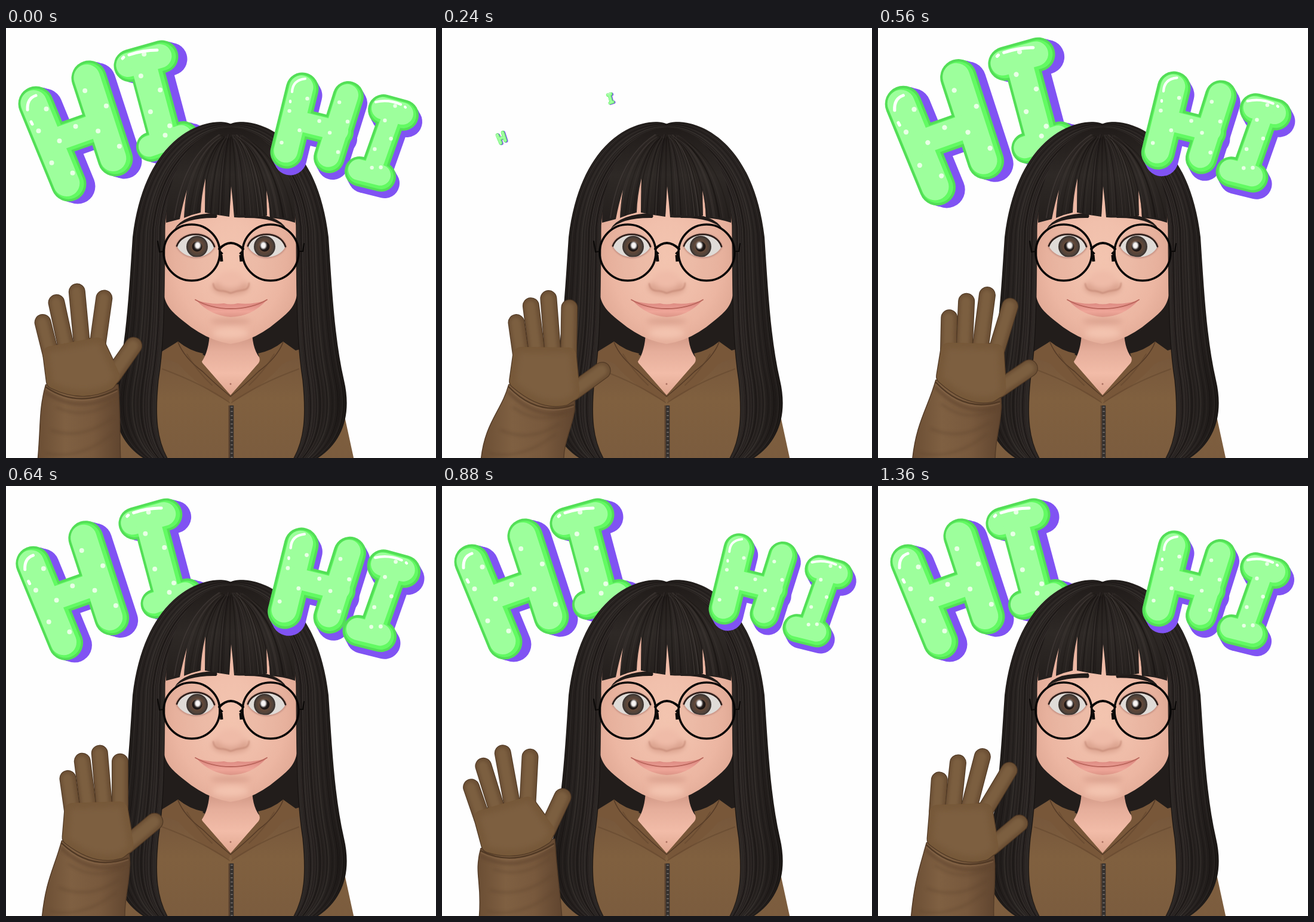
An HTML page for the animation above (1.44 s loop, 720 by 720 pixels).

```html
<!DOCTYPE html>
<html lang="en">
<head>
<meta charset="utf-8">
<title>Waving hello</title>
<style>
html, body { margin: 0; width: 100%; height: 100%; overflow: hidden; background: #fefefe; }
svg { display: block; width: 100vw; height: 100vh; }
</style>
</head>
<body>
<svg id="stage" viewBox="0 0 720 720" fill="none" stroke-linecap="round" stroke-linejoin="round"></svg>
<script>
const STEP = 80, STEPS = 18;
const el = id => document.getElementById(id);
const mix = (a, b, t) => a + (b - a) * t;
const mixAll = (a, b, t) => a.map((v, i) => mix(v, b[i], t));
// point at a compass-like angle: 0 is up, 90 is right
const polar = ([x, y], deg, r) => [x + r * Math.sin(deg * Math.PI / 180), y - r * Math.cos(deg * Math.PI / 180)];

let seed = 7;
const rnd = () => (seed = (seed * 16807) % 2147483647) / 2147483647;

const line = (d, color, width, extra = '') => `<path d="${d}" stroke="${color}" stroke-width="${width}" ${extra}/>`;
const shape = (d, fill, extra = '') => `<path d="${d}" fill="${fill}" ${extra}/>`;
const mirror = s => `<g transform="translate(752 0) scale(-1 1)">${s}</g>`;

// ---------- bubble letters: strokes are [x0, y0, x1, y1, width, dots] ----------
const leftStyle = { shadow: [15, 4], dot: 4, start: 3 };
const rightStyle = { shadow: [6, 11], dot: 3.2, start: 5, drift: [0, 0] };
const letters = {
  h1: { ...leftStyle, c: [122, 174], drift: [-22, 10], shine: 'M36 137Q35 118 50 113M42 157L44 161',
    strokes: [[50, 127, 105, 261, 59, 5], [139, 84, 183, 219, 59, 4], [78, 191, 163, 161, 54, 1]] },
  i1: { ...leftStyle, c: [252, 122], drift: [30, -4], shine: 'M195 51L197 49M206 45Q230 37 253 37',
    strokes: [[208, 63, 261, 48, 55, 1], [234, 62, 266, 182, 57, 4], [243, 199, 297, 181, 50, 1]] },
  h2: { ...rightStyle, c: [523, 166], shine: 'M479 107Q480 87 501 85M476 122L476 124',
    strokes: [[496, 102, 470, 208, 55, 4], [573, 115, 541, 217, 52, 4], [486, 157, 558, 175, 48, 1]] },
  i2: { ...rightStyle, c: [632, 198], shine: 'M619 124Q640 119 661 128M668 132L669 133',
    strokes: [[632, 137, 665, 146, 52, 1], [648, 146, 614, 242, 45, 4], [592, 240, 628, 249, 50, 1]] }
};

// white dots zigzag along each stroke
function dots({ strokes, dot }) {
  let s = '';
  strokes.forEach(([x0, y0, x1, y1, w, n], j) => {
    const len = Math.hypot(x1 - x0, y1 - y0);
    for (let i = 0; i < n; i++) {
      const t = (i + .5) / n, side = ((i + j) % 2 ? -1 : 1) * w * .22;
      const cx = mix(x0, x1, t) + side * (y1 - y0) / len, cy = mix(y0, y1, t) - side * (x1 - x0) / len;
      s += `<circle cx="${cx}" cy="${cy}" r="${dot}" fill="#e9ffe6"/>`;
    }
  });
  return s;
}

function letter(id) {
  const o = letters[id], [px, py] = o.shadow;
  const layer = (k, grow, color) => `<g transform="translate(${px * k} ${py * k})">` +
    o.strokes.map(([a, b, c, d, w]) => line(`M${a} ${b}L${c} ${d}`, color, w + grow)).join('') + '</g>';
  return `<g id="${id}">` + layer(1, 0, '#8053f3') + layer(.5, 0, '#8053f3') + layer(0, 0, '#53de57') +
    layer(0, -8, '#62fa62') + layer(-.24, -15, '#9dff9c') + dots(o) + line(o.shine, '#fff', o.dot + 1) + '</g>';
}

// quick pop, then one wobble around full size
function placeLetter(id, k) {
  const { c: [x, y], drift: [dx, dy], start } = letters[id];
  const n = k ? k - start : STEPS, turn = Math.PI * (n - 1.6) / 6.4;
  let size = 1, drift = 0;
  if (n < 2) {
    size = mix(.1, 1, n / 2);
    drift = 1 - n / 2;
  } else if (n < 8) {
    size = 1 + .055 * Math.sin(2 * turn);
    drift = .24 * Math.sin(turn);
  }
  el(id).setAttribute('display', n < 0 ? 'none' : 'inline');
  el(id).setAttribute('transform', `translate(${x + dx * drift} ${y + dy * drift}) scale(${size}) translate(${-x} ${-y})`);
}

// ---------- hair: two edge curves, strands run between them ----------
const outer = [377, 161, 350, 147, 234, 165, 212, 350, 206, 440, 202, 520, 186, 590, 172, 650, 190, 698, 236, 724];
const inner = [377, 172, 325, 180, 272, 250, 266, 330, 265, 450, 266, 520, 255, 590, 249, 650, 252, 690, 272, 724];
const curve = n => `M${n[0]} ${n[1]}` + [2, 8, 14].map(i => 'C' + n.slice(i, i + 6).map(v => v.toFixed(1)).join(' ')).join('');
const reversed = n => n.map((v, i) => n[n.length - 2 - i + 2 * (i % 2)]);
const strand = (d, extra = '') => line(d, rnd() < .5 ? '#453e3b' : '#100c0b', .6 + 1.3 * rnd(), `opacity="${.2 + .3 * rnd()}" ${extra}`);

function sideHair() {
  let s = shape(curve(outer) + curve(reversed(inner)).replace('M', 'L') + 'Z', 'url(#side)');
  for (let i = 0; i < 38; i++) s += strand(curve(mixAll(outer, inner, .03 + .94 * rnd())));
  return s + line(curve(inner), '#15110f', 1.5, 'opacity=".7"');
}

function bangs() {
  const d = 'M268 326C268 255 300 172 377 166C452 172 486 255 484 326Q463 319 442 318Q441 292 436 272L437 314Q410 319 382 317Q380 290 377 265L374 316Q352 313 333 309Q333 280 334 252Q327 280 326 309Q312 312 298 318Q299 296 303 271Q296 294 291 320Z';
  let s = `<clipPath id="fringeClip"><path d="${d}"/></clipPath>` + shape(d, 'url(#fringe)');
  for (let i = 0; i < 64; i++) {
    const x = 270 + 212 * rnd(), u = x - 376;
    s += strand(`M${376 + u * .2} ${178 + 8 * rnd()}C${376 + u * .65} 205 ${376 + u * .9} 255 ${x} ${311 + Math.abs(u) * .07}`,
      'clip-path="url(#fringeClip)"');
  }
  return s;
}

// ---------- body and face ----------
function torso() {
  const flap = 'M260 545L288 525Q306 540 330 545Q325 556 329 561L376 615L373 626Q320 600 290 563Q275 555 260 553Z';
  const seams = line('M288 526Q298 552 329 575Q348 594 376 617', '#553b27', 1.6) +
    line('M262 571Q330 596 374 627M303 546Q320 575 345 598', '#60442d', 2, 'opacity=".5"');
  const half = shape(flap, '#785739') + seams;
  return shape('M165 720L192 640L230 560L262 541L288 525Q308 541 332 548L376 612L426 547Q452 550 492 538L520 560L568 655L583 724H165Z', 'url(#cloth)') +
    shape('M341 505Q341 540 327 560L376 615L428 556Q412 540 412 505Z', 'url(#neck)') + half + mirror(half) +
    line('M377 632V724', '#5a422f', 9, 'stroke-linecap="butt"') +
    line('M378 632V724', '#35312f', 6, 'stroke-linecap="butt"') +
    line('M378 634V724', '#68625e', 3.5, 'stroke-linecap="butt" stroke-dasharray="2 5"') +
    '<circle cx="376" cy="596" r="1.5" fill="#a96e60"/>';
}

function face() {
  return shape('M263 240V440C266 464 277 475 296 490Q335 523 376 529Q418 523 456 490C475 475 486 464 488 440V240Z', 'url(#skin)') +
    '<g filter="url(#soft)"><ellipse cx="376" cy="434" rx="31" ry="13" fill="#cf927e" opacity=".7"/>' +
    '<ellipse cx="376" cy="422" rx="23" ry="15" fill="#efbba8"/>' +
    '<ellipse cx="376" cy="491" rx="34" ry="5" fill="#cd917f" opacity=".6"/>' +
    '<ellipse cx="376" cy="511" rx="30" ry="9" fill="#f7cbb7" opacity=".7"/></g>' +
    line('M347 428Q348 439 359 440Q367 440 376 444Q386 440 396 439Q407 438 407 427', '#b57865', 2, 'opacity=".6" filter="url(#blur1)"') +
    shape('M319 456Q346 464 365 461Q376 464 388 461Q410 464 436 456Q412 483 376 484Q341 481 319 456Z', 'url(#lips)') +
    line('M317 455Q343 470 376 470Q412 470 437 455', '#b9655b', 1.8);
}

function eye(x, irisX, shineX) {
  const top = `M${x - 32} 365C${x - 24} 340 ${x + 22} 338 ${x + 31} 366`;
  const d = top + `C${x + 20} 389 ${x - 20} 390 ${x - 32} 365Z`;
  return `<clipPath id="eye${x}"><path d="${d}"/></clipPath>` +
    line(d, '#cb9789', 4, 'filter="url(#blur1)"') + shape(d, '#e4e2df') +
    `<g clip-path="url(#eye${x})"><circle cx="${irisX}" cy="366" r="18" fill="#3b3531"/>` +
    `<circle cx="${irisX}" cy="366" r="15.5" fill="url(#iris)"/><circle cx="${irisX}" cy="366" r="8.5" fill="#171312"/>` +
    `<ellipse cx="${shineX}" cy="364" rx="5" ry="6" fill="#fff" filter="url(#blur1)"/></g>` +
    line(top, '#2a1d1a', 2.8);
}

const lid = (x, tilt) => `<ellipse cx="${x}" cy="363" rx="34" ry="20" fill="#dbab98" filter="url(#blur2)"/>` +
  line(`M${x - 29} ${371 - tilt}Q${x} 384 ${x + 28} ${371 + tilt}`, '#35241f', 3.2);

function glasses() {
  const rim = x => `<circle cx="${x}" cy="376" r="47" stroke="#070606" stroke-width="3.6" fill="#805040" fill-opacity=".05"/>`;
  return rim(311) + rim(443) + line('M357 370Q376 350 397 370', '#070606', 4) +
    line('M358 375L362 379M360 380L361 391M396 375L392 379M393 380L394 391', '#0b0908', 5, 'stroke-linecap="butt"') +
    line('M264 374L257 375L254 357M491 374L497 374L499 361', '#0b0908', 2.2);
}

function brows(drop) {
  const y = 310 + drop;
  const d = `M282 337Q289 324 308 ${317 + drop * .3}Q328 ${y} 352 ${y}Q355 ${y + 5} 352 ${y + 8}Q302 ${y + 7} 282 337Z`;
  return shape(d, '#211b19') + mirror(shape(d, '#211b19'));
}

// ---------- hand ----------
// x, y of the knuckles; turn of the palm; angle of the little finger; opening of the fan; sleeve edge
const pose = {
  left: [114, 538, 35, -14, 22, 53],
  tilt: [172, 547, 54, -8, 9, 65],
  lean: [172, 537, 67, 20, 31, 52],
  mid: [151, 542, 50, -8, 8, 60],
  far: [105, 544, 25, -19, 22, 62],
  fan: [139, 545, 50, 4, 27, 55]
};
const wave = [[0, 'left'], [3, 'tilt'], [5, 'lean'], [8, 'mid'], [11, 'far'], [14, 'tilt'], [17, 'fan'], [18, 'left']];
const fingerLength = [54, 77, 89, 79];

function poseAt(k) {
  const i = wave.findIndex(w => w[0] > k);
  const [k0, a] = wave[i - 1], [k1, b] = wave[i];
  return mixAll(pose[a], pose[b], (k - k0) / (k1 - k0));
}

function finger(from, to, w) {
  const d = `M${from}L${to}`;
  return line(d, '#513a26', w + 1.5) + line(d, '#6b4f34', w - 1) +
    line(d, '#7c5e40', w - 9, 'transform="translate(-1 0)" filter="url(#blur2)"');
}

function hand([x, y, turn, first, open, sl]) {
  const c = [x, y], slope = (turn - 53) / 1.7;
  const kl = polar(c, slope - 90, 40), kr = polar(c, slope + 90, 40);
  const root = polar(c, turn + 90 - 2 * (turn - 45) + 2 * (turn - 45), 78);
  const thumb = polar(root, turn, 62);
  const [rx, ry] = polar(c, turn + 100, 89), [lx, ly] = polar(c, 185 + .7 * turn, 68);
  const mx = (lx + rx) / 2, my = (ly + ry) / 2;
  const rim = dy => `M${lx - 14} ${ly + 3 + dy}Q${mx - 8} ${my + 38 + dy} ${rx + 9} ${ry + 3 + dy}`;
  const palm = `M${kl}L${kr}L${root}L${rx - 6} ${ry - 8}Q${mx} ${my + 16} ${lx} ${ly - 6}Z`;

  let s = shape(`M${lx - 14} ${ly}C${lx - 26} ${ly + 45} ${sl + 6} 660 ${sl} 726H${sl + 139}C${sl + 137} 690 ${rx + 15} 655 ${rx + 11} ${ry - 4}Z`,
    'url(#sleeve)', 'stroke="#543c28" stroke-width="1.5"');
  s += line(rim(10), '#60452f', 5, 'opacity=".7" filter="url(#blur2)"');
  for (let i = 0; i < 3; i++) {
    const t = (i + 1) / 3, a = mix(lx, sl, t) + 14, b = mix(rx, sl + 125, t);
    s += line(`M${a} ${mix(ly, 712, t)}Q${(a + b) / 2} ${mix(my, 700, t) + 24} ${b} ${mix(ry, 680, t)}`, '#5e442e', 3.5, 'opacity=".45" filter="url(#blur2)"');
  }
  s += line(palm, '#513a26', 27.5);
  for (let i = 0; i < 4; i++) {
    const t = i / 3, [bx, by] = mixAll(kl, kr, t), base = [bx, by - 24 * t * (1 - t)];
    s += finger(base, polar(base, first + open * t ** 2.3, fingerLength[i]), 26.5);
  }
  return s + finger(root, thumb, 28) +
    shape(palm, '#765839', 'stroke="#765839" stroke-width="25"') +
    shape(palm, '#7d5f41', 'stroke="#7d5f41" stroke-width="6" filter="url(#soft)"') +
    line(rim(1), '#4f3824', 2.2) + line(rim(4), '#86674a', 1.5, 'opacity=".6"');
}

// ---------- scene ----------
const stops = colors => colors.map((c, i) => `<stop offset="${i / (colors.length - 1)}" stop-color="${c}"/>`).join('');
const across = (id, ...colors) => `<linearGradient id="${id}">${stops(colors)}</linearGradient>`;
const down = (id, ...colors) => `<linearGradient id="${id}" x2="0" y2="1">${stops(colors)}</linearGradient>`;
const round = (id, r, ...colors) => `<radialGradient id="${id}" r="${r}">${stops(colors)}</radialGradient>`;
const blur = (id, n) => `<filter id="${id}" filterUnits="userSpaceOnUse" x="0" y="0" width="720" height="720"><feGaussianBlur stdDeviation="${n}"/></filter>`;

const panel = sideHair();
el('stage').innerHTML = '<defs>' +
  across('side', '#1d1917', '#2b2624', '#2a2523', '#221e1c') +
  down('fringe', '#211c1a', '#2e2926', '#241f1d') +
  down('cloth', '#73543a', '#80603f', '#7b5c3e') +
  across('sleeve', '#6b4e34', '#7f6042', '#78593d', '#60452f') +
  down('neck', '#c98f7d', '#e6ae9b', '#f2bca8', '#dfa58f') +
  round('skin', .62, '#f3c4af', '#f1c0ac', '#ecb6a2', '#dca490') +
  down('lips', '#d98379', '#e3938a', '#efa699', '#dc9486') +
  round('iris', .5, '#6a4d38', '#664b39', '#4a403a') +
  blur('soft', 5) + blur('blur1', 1) + blur('blur2', 2.5) + '</defs>' +
  '<rect width="720" height="720" fill="#fefefe"/>' +
  letter('h1') + letter('i1') +
  shape('M250 300H500L494 600H258Z', '#221d1b') +
  torso() + face() +
  '<g id="open">' + eye(318, 320, 321) + eye(437, 433, 431) + '</g>' +
  '<g id="shut">' + lid(315, 2) + lid(439, -2) + '</g><g id="brows"></g>' +
  panel + mirror(panel) + bangs() + glasses() +
  letter('h2') + letter('i2') + '<g id="hand"></g>';

let shown = -1;
function tick() {
  const k = Math.floor(performance.now() / STEP) % STEPS;
  if (k !== shown) {
    shown = k;
    for (const id in letters) placeLetter(id, k);
    const blink = Math.max(0, 1 - Math.abs(k - 14.5) / 3.5), closed = blink > .7;
    el('open').setAttribute('display', closed ? 'none' : 'inline');
    el('shut').setAttribute('display', closed ? 'inline' : 'none');
    el('brows').innerHTML = brows(12 * blink);
    el('hand').innerHTML = hand(poseAt(k));
  }
  requestAnimationFrame(tick);
}
tick();
</script>
</body>
</html>
```
